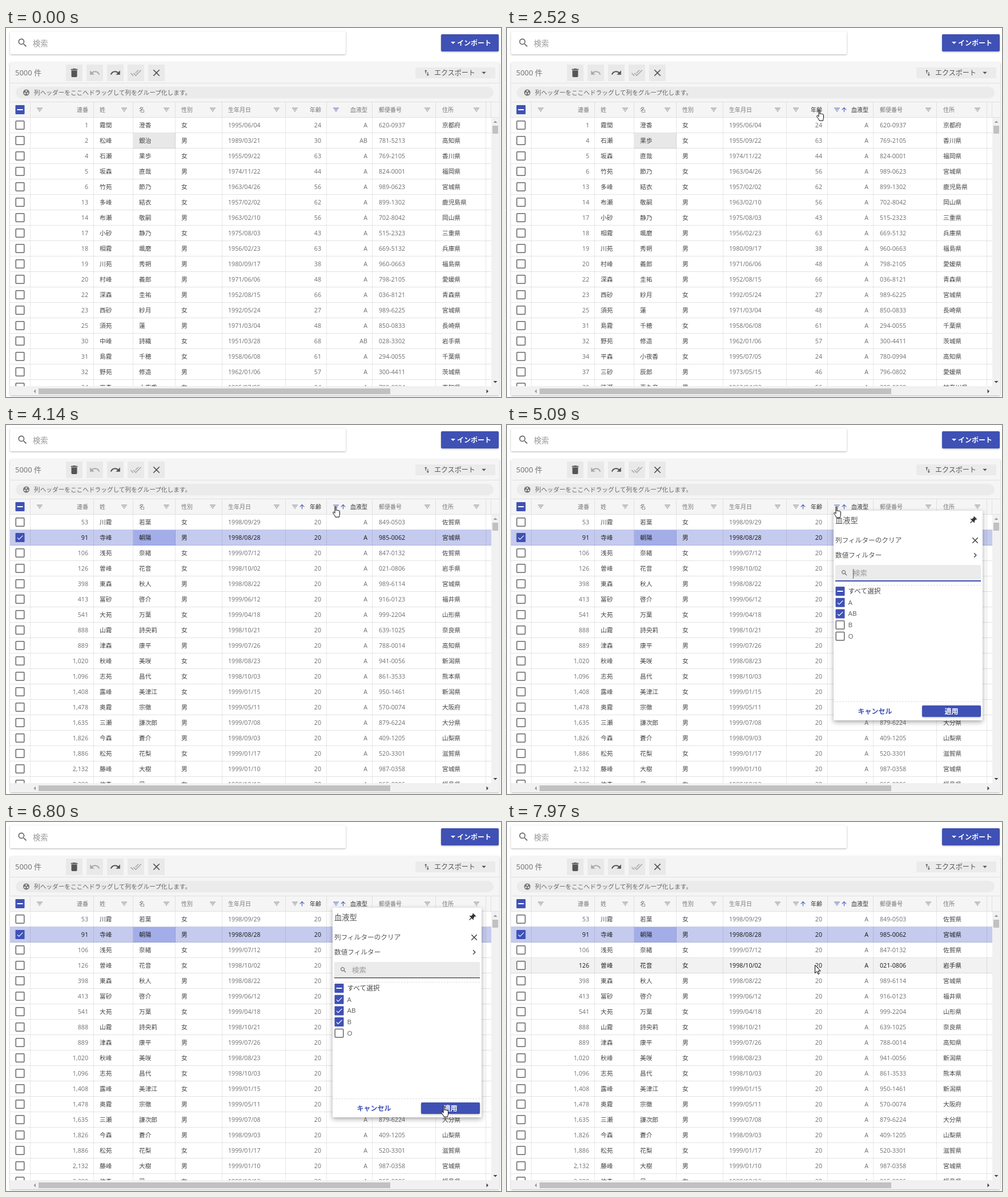
Animation of 867 by 646 pixels, one loop 8000 ms. Source, as an HTML page:

```html
<!DOCTYPE html>
<html lang="ja">
<head>
<meta charset="utf-8">
<title>データグリッド</title>
<style>
html, body { margin: 0; width: 100%; height: 100%; overflow: hidden; background: #fff; }
svg { display: block; }
text { font-family: 'Noto Sans', 'Noto Sans CJK JP', sans-serif; white-space: pre; }
.card { filter: drop-shadow(0 1px 1.5px rgba(0,0,0,.3)); }
.menu { filter: drop-shadow(0 3px 4px rgba(0,0,0,.35)); }
</style>
</head>
<body>
<svg width="867" height="646" viewBox="0 0 867 646">
  <g id="base"></g>
  <g id="live"></g>
  <path id="cursor" stroke="#000" fill="#fff" stroke-linejoin="round"/>
</svg>
<script>
const LOOP = 8000, BLUE = '#3f51b5';
const $ = id => document.getElementById(id);

// id, family name, given name, sex, birthday, postcode, prefecture, blood type
const parse = s => s.trim().split('\n').map(line => line.split(' '));
const people = parse(`
1 霧間 澄香 女 1995/06/04 620-0937 京都府
2 松峰 銀治 男 1989/03/21 781-5213 高知県 AB
4 石瀬 果歩 女 1955/09/22 769-2105 香川県
5 坂森 直哉 男 1974/11/22 824-0001 福岡県
6 竹苑 節乃 女 1963/04/26 989-0623 宮城県
13 多峰 結衣 女 1957/02/02 899-1302 鹿児島県
14 布瀬 敬嗣 男 1963/02/10 702-8042 岡山県
17 小砂 静乃 女 1975/08/03 515-2323 三重県
18 相霧 颯磨 男 1956/02/23 669-5132 兵庫県
19 川苑 秀朔 男 1980/09/17 960-0663 福島県
20 村峰 義郎 男 1971/06/06 798-2105 愛媛県
22 深森 圭祐 男 1952/08/15 036-8121 青森県
23 西砂 紗月 女 1992/05/24 989-6225 宮城県
25 須苑 蓮 男 1971/03/04 850-0833 長崎県
30 中峰 詩織 女 1951/03/28 028-3302 岩手県 AB
31 島霧 千穂 女 1958/06/08 294-0055 千葉県
32 野苑 修造 男 1962/01/06 300-4411 茨城県
34 平森 小夜香 女 1995/07/05 780-0994 高知県
37 三砂 辰郎 男 1973/05/15 796-0802 愛媛県
39 徳瀬 喜久彦 男 1963/04/23 229-0029 神奈川県`);
const youngest = parse(`
53 川霧 若葉 女 1998/09/29 849-0503 佐賀県
91 寺峰 朝陽 男 1998/08/28 985-0062 宮城県
106 浅苑 奈緒 女 1999/07/12 847-0132 佐賀県
126 曽峰 花音 女 1998/10/02 021-0806 岩手県
398 東森 秋人 男 1998/08/22 989-6114 宮城県
413 冨砂 啓介 男 1999/06/12 916-0123 福井県
541 大苑 万葉 女 1999/04/18 999-2204 山形県
888 山霧 詩央莉 女 1998/10/21 639-1025 奈良県
889 津森 康平 男 1999/07/26 788-0014 高知県
1,020 秋峰 美咲 女 1998/08/23 941-0056 新潟県
1,096 志苑 昌代 女 1998/10/03 861-3533 熊本県
1,408 露峰 美津江 女 1999/01/15 950-1461 新潟県
1,478 奥霧 宗徹 男 1999/05/11 570-0074 大阪府
1,635 三瀬 謙次郎 男 1999/07/08 879-6224 大分県
1,826 今森 蒼介 男 1998/09/03 409-1205 山梨県
1,886 松苑 花梨 女 1999/01/17 520-3301 滋賀県
2,132 藤峰 大樹 男 1999/01/10 987-0358 宮城県
2,299 伸森 凪 女 1998/10/12 965-0006 福島県`);
const views = [people.slice(0, 18), people.filter(p => !p[7]), youngest];

const age = birthday => {
  const [y, m, d] = birthday.split('/').map(Number);
  return 2019 - y - (m * 100 + d > 801);
};

// Columns: title, text x, filter icon x, right aligned
const columns = [
  ['連番', 144, 59, 1], ['姓', 164, 207], ['名', 233, 281], ['性別', 307, 362],
  ['生年月日', 389, 474], ['年齢', 552, 506, 1], ['血液型', 633, 578, 1],
  ['郵便番号', 653, 738], ['住所', 764, 824]];
const dividers = [43, 154, 223, 297, 379, 490, 562, 642, 753, 841];

const icons = {
  search: 'M15.5 14h-.8l-.3-.3A6.5 6.5 0 1 0 13.7 14.4l.3.3v.8l5 5 1.5-1.5zM9.5 14a4.5 4.5 0 1 1 0-9 4.5 4.5 0 0 1 0 9z',
  trash: 'M6 19q0 2 2 2h8q2 0 2-2V7H6zM19 4h-3.5l-1-1h-5l-1 1H5v2h14z',
  undo: 'M12.5 8Q8.600 8 5.600 10.600L2 7v9h9l-3.600-3.600Q9.500 10.500 12.500 10.500 18 10.700 20.100 16l2.400-.8Q20 8.200 12.500 8z',
  redo: 'M11.500 8Q15.400 8 18.400 10.600L22 7v9h-9l3.600-3.600Q14.500 10.500 11.500 10.500 6 10.700 3.900 16l-2.400-.8Q4 8.200 11.500 8z',
  doneAll: 'M18 7l-1.400-1.400-6.300 6.300 1.400 1.400zM22.200 5.600L11.700 16.200 7.500 12l-1.400 1.400 5.600 5.600 12-12zM.4 13.400L6 19l1.400-1.400L1.800 12z',
  close: 'M19 6.400L17.600 5 12 10.600 6.400 5 5 6.400 10.600 12 5 17.600 6.400 19 12 13.400 17.600 19 19 17.600 13.400 12z',
  filter: 'M10 18h4v-2h-4zM3 6v2h18V6zM6 13h12v-2H6z',
  up: 'M4 12l1.400 1.400L11 7.800V20h2V7.800l5.600 5.600L20 12l-8-8z',
  swap: 'M9 3L5 7h3v7h2V7h3zM16 17v-7h-2v7h-3l4 4 4-4z',
  drop: 'M6 9l6 6 6-6z',
  next: 'M8.600 16.600L13.200 12 8.600 7.400 10 6l6 6-6 6z',
  pin: 'M16 9V4h1q1 0 1-1t-1-1H7q-1 0-1 1t1 1h1v5q0 3-3 3v2h6v7l1 1 1-1v-7h6v-2q-3 0-3-3z',
  check: 'M9 16.200L4.800 12l-1.400 1.400L9 19 21 7l-1.400-1.400z'
};
const HAND = 'M4 1.500c0-1.300 2-1.300 2 0v6c.3-1 2.100-.9 2.200.2.5-.8 2-.6 2.100.5.6-.6 2.200-.3 2.200 1v4c0 3-1 3.500-1 6h-6.500c-.3-2.300-4-6-4.300-7.500s1.400-2 2.300-.6l1 1.200z';
const ARROW = 'M.5.5v14l3.300-3 2.200 5 2-.9-2.100-4.800h4.400z';

const rect = (x, y, w, h, fill, more = '') =>
  `<rect x="${x}" y="${y}" width="${w}" height="${h}" fill="${fill}" ${more}/>`;
const text = (x, y, s, size, fill, more = '') =>
  `<text x="${x}" y="${y}" font-size="${size}" fill="${fill}" ${more}>${s}</text>`;
const icon = (name, cx, cy, size, fill, more = '') =>
  `<path d="${icons[name]}" fill="${fill}" transform="translate(${cx} ${cy}) scale(${size / 24}) ${more} translate(-12 -12)"/>`;
const line = (d, stroke, more = '') => `<path d="${d}" fill="none" stroke="${stroke}" ${more}/>`;
const END = 'text-anchor="end"', BOLD = 'font-weight="700"', MID = 'text-anchor="middle"';

function checkbox(cx, cy, state) {
  if (!state) return rect(cx - 7.25, cy - 7.25, 14.5, 14.5, '#fff', 'stroke="#666" stroke-width="1.5" rx="1"');
  return rect(cx - 8, cy - 8, 16, 16, BLUE, 'rx="1"') +
    (state === 'some' ? rect(cx - 5, cy - 1, 10, 2, '#fff') : icon('check', cx, cy, 14, '#fff'));
}

function base() {
  const buttons = [['trash', '#555'], ['undo', '#aaa'], ['redo', '#555'], ['doneAll', '#aaa'], ['close', '#555']];
  return rect(7, 6, 588, 40, '#fff', 'rx="2" class="card"') +
    icon('search', 29, 26, 20, '#666') + text(47, 32, '検索', 13.3, '#999') +
    rect(762, 11, 101, 30, BLUE, 'rx="2" class="card"') +
    icon('drop', 783, 26, 16, '#fff') + text(790, 31, 'インポート', 12, '#fff', BOLD) +
    rect(7, 60, 857, 583, '#fff', 'rx="2" class="card"') +
    rect(7, 60, 857, 97, '#f5f5f5', 'rx="2"') +
    text(16, 83, '5000 件', 13, '#777') +
    buttons.map(([name, color], i) =>
      rect(105 + 36 * i, 64, 29, 29, '#e9e9e9', 'rx="1"') + icon(name, 119.5 + 36 * i, 78.5, 20, color)).join('') +
    rect(717, 69, 140, 19, '#ebebeb', 'rx="2"') + icon('swap', 737, 78.5, 14, '#555') +
    text(750, 83, 'エクスポート', 12, '#555', 'font-weight="500"') + icon('drop', 837, 78.5, 15, '#555') +
    rect(17, 103, 837, 20, '#ebebeb', 'rx="10"') +
    '<circle cx="35.500" cy="113" r="5.500" fill="#777"/>' +
    [[35.5, 110.5], [33.2, 114.5], [37.8, 114.5]].map(([x, y]) => `<circle cx="${x}" cy="${y}" r="1.400" fill="#ebebeb"/>`).join('') +
    text(49, 117, '列ヘッダーをここへドラッグして列をグループ化します。', 10.67, '#666') +
    line('M7 96.500H864M7 129.500H864M7 156.500H864', '#e0e0e0') +
    line(dividers.concat(850).map(x => `M${x - .5} 130V157`).join(''), '#e0e0e0') +
    checkbox(24.5, 143, 'some') +
    rect(850, 157, 14, 470, '#f1f1f1') + rect(852, 171, 10, 14, '#c1c1c1') +
    rect(7, 627, 857, 16, '#f1f1f1') + rect(57, 631, 616, 10, '#c1c1c1') +
    '<path d="M853.500 166h7l-3.500-3.500z M52 632.500v7l-3.500-3.500z" fill="#999"/>' +
    '<path d="M853.500 618h7l-3.500 3.500z M841.500 632.500v7l3.500-3.500z" fill="#444"/>';
}

function header(t, c) {
  const sorted = { 5: t >= 3200, 6: t >= 1850 };
  const fade = start => Math.max(0, Math.min(1, (t - start) / 180)).toFixed(2);
  const arrow = (col, x, start) => `<g opacity="${fade(start)}">` +
    icon('up', x, 143, 12.5, sorted[col] ? BLUE : '#888') + '</g>';
  return columns.map(([title, x, fx, right], i) => {
    const over = c.y < 157 && c.x >= dividers[i] && c.x < dividers[i + 1];
    return text(x, 146.5, title, 10, sorted[i] || over ? '#333' : '#777', right ? END : '') +
      icon('filter', fx, 143, 13, i === 6 ? BLUE : '#777');
  }).join('') + arrow(5, 518.5, 2560) + arrow(6, 590.5, 1270);
}

function rows(t, c, open) {
  const view = t < 1850 ? 0 : t < 3200 ? 1 : 2;
  const hover = !open && c.x < 850 && c.y >= 157 && c.y < 627 ? Math.floor((c.y - 157) / 27) : -1;
  const body = views[view].slice(0, 18).map(([id, family, given, sex, born, post, place, blood = 'A'], i) => {
    const y = 27 * i, picked = view === 2 && i === 1, strong = picked || i === hover;
    const cells = [id, family, given, sex, born, age(born), blood, post, place];
    return (picked ? rect(7, y - 1, 843, 28, '#c5cbee') : i === hover ? rect(7, y, 843, 27, '#f2f2f2') : '') +
      (i === 1 ? rect(223, y, 74, 27, picked ? '#a3aee9' : '#e8e8e8') : '') +
      checkbox(24.5, y + 13, picked) +
      cells.map((s, k) => {
        const kanji = [1, 2, 3, 8].includes(k);
        return text(columns[k][1], y + 17, s, 10.67, strong ? '#222' : kanji ? '#444' : '#777', columns[k][3] ? END : '');
      }).join('') + line(`M7 ${y + 26.5}H850`, 'rgba(0,0,0,.11)');
  }).join('');
  return `<svg y="157" width="850" height="470">${body}${line(dividers.map(x => `M${x - .5} 0V470`).join(''), 'rgba(0,0,0,.09)')}</svg>`;
}

function menu(t, c, alpha) {
  const focus = t > 4850 && t < 5960;
  const caret = focus && Math.floor((t - 4850) / 500) % 2 === 0;
  const over = Math.floor((c.y - 281) / 19.7);
  const items = [['すべて選択', 'some'], ['A', 1], ['AB', 1], ['B', t > 6010], ['O', 0]];
  return `<g opacity="${alpha.toFixed(2)}">` + rect(572, 150, 261, 367, '#fff', 'rx="2" class="menu"') +
    text(575, 172, '血液型', 13.3, '#555') + icon('pin', 816, 167, 16, '#333', 'rotate(45)') +
    text(575, 206, '列フィルターのクリア', 11.67, '#555') + icon('close', 820, 202, 18, '#444') +
    text(575, 232, '数値フィルター', 11.67, '#555') + icon('next', 820, 228, 17, '#444') +
    rect(575, 245, 255, 28, '#ebebeb', 'rx="2"') + rect(575, 272, 255, focus ? 2 : 1.5, focus ? BLUE : '#555') +
    icon('search', 591, 259, 13, '#666') + text(606, 264, '検索', 12.5, '#999') +
    (caret ? rect(606, 252, 1, 17, BLUE) : '') +
    line('M572 280.500H833M572 484.500H833', '#ddd', 'stroke-dasharray="3 2"') +
    items.map(([label, state], i) => {
      const y = 291 + 19.7 * i;
      return (i === over ? rect(572, y - 10, 261, 19.7, '#ebebeb') : '') +
        checkbox(583.5, y, state) + text(597.5, y + 4, label, 11.67, i ? '#666' : '#444');
    }).join('') +
    text(644.5, 505.500, 'キャンセル', 12, BLUE, BOLD + MID.padStart(MID.length + 1)) +
    rect(727, 491, 103, 20, BLUE, 'rx="2" class="card"') +
    text(778.5, 505.500, '適用', 12, '#fff', `${BOLD} ${MID}`) + '</g>';
}

// Pointer moves: start, end, target x, target y
const moves = [[490, 1310, 616, 138], [2220, 2530, 547, 143], [2530, 2850, 540, 149],
  [3490, 4130, 577, 142], [5060, 5860, 585, 354], [6020, 6730, 767, 497], [7580, 7960, 539, 250]];
function pointer(t) {
  let x = 872, y = 648;
  for (const [from, to, tx, ty] of moves) {
    const u = Math.max(0, Math.min(1, (t - from) / (to - from))), k = u * u * (3 - 2 * u);
    x += (tx - x) * k;
    y += (ty - y) * k;
  }
  return { x, y };
}

const ramp = (t, a, b) => Math.max(0, Math.min(1, (t - a) / (b - a)));
$('base').innerHTML = base();
let last = '';
function draw(now) {
  const t = now % LOOP, c = pointer(t);
  const alpha = ramp(t, 4600, 4820) - ramp(t, 6940, 7100), open = alpha > 0;
  const html = header(t, c) + rows(t, c, open) + (open ? menu(t, c, alpha) : '');
  if (html !== last) $('live').innerHTML = last = html;
  const hand = c.y < 157 || open && (c.y > 190 && c.y < 381 || c.y > 488);
  $('cursor').setAttribute('d', hand ? HAND : ARROW);
  $('cursor').setAttribute('transform', `translate(${Math.round(c.x) - (hand ? 5 : 0)} ${Math.round(c.y)})`);
  requestAnimationFrame(draw);
}
requestAnimationFrame(draw);
</script>
</body>
</html>
```
